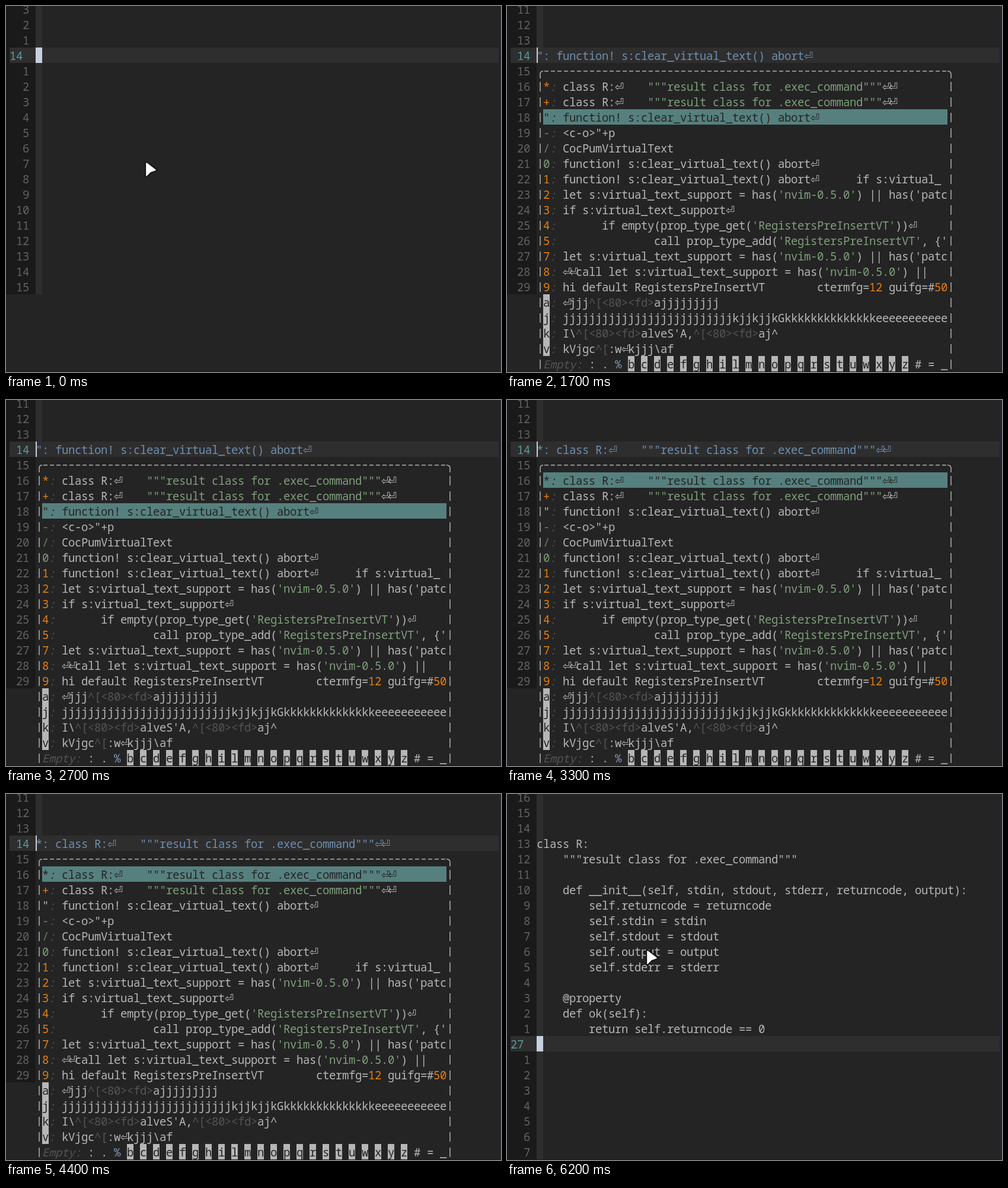
Recreate the animation shown at these times as an HTML page with a canvas. Size 835x617 px, loop 6300 ms.

```html
<!DOCTYPE html>
<html lang="en">
<head>
<meta charset="utf-8">
<title>Register picker</title>
<style>
html, body { margin: 0; width: 100%; height: 100%; overflow: hidden; background: #242424; }
canvas { display: block; }
</style>
</head>
<body>
<canvas id="stage" width="835" height="617"></canvas>
<script>
const ctx = document.getElementById('stage').getContext('2d', { alpha: false });
const W = 835, H = 617, LOOP = 6300;
const CW = 11, RH = 26, BASE = 21, LEFT = 50, FIRST = 11;
const FACE = '19px "Noto Sans Mono", monospace';
const RETURN_FACE = '18.67px "DejaVu Sans", sans-serif';
const C = {
  bg: '#242424', gutter: '#1a1a1a', line: '#2e2e2e', num: '#626262', cur: '#5a9a9c',
  text: '#b6b6b6', dim: '#545454', green: '#7e9e7a', orange: '#e67e0c', blue: '#6e8eae',
  teal: '#56807e', dark: '#242424', panel: '#404040', caret: '#c8d0e0', border: '#b0b0b0'
};

const CODE = [
  'class R:',
  '    """result class for .exec_command"""',
  '',
  '    def __init__(self, stdin, stdout, stderr, returncode, output):',
  '        self.returncode = returncode',
  '        self.stdin = stdin',
  '        self.stdout = stdout',
  '        self.output = output',
  '        self.stderr = stderr',
  '',
  '    @property',
  '    def ok(self):',
  '        return self.returncode == 0'
];
const CLS = 'class R:⏎    """result class for .exec_command"""⏎⏎';
const FUN = 'function! s:clear_virtual_text() abort';
const LET = "let s:virtual_text_support = has('nvim-0.5.0') || ";
const ESC = '^[<80><fd>';

const REGS = [
  ['*', CLS, C.orange],
  ['+', CLS, C.orange],
  ['"', FUN + '⏎', C.text],
  ['-', '<c-o>"+p', '#5f7f5c'],
  ['/', 'CocPumVirtualText', '#64845f'],
  ['0', FUN + '⏎', C.green],
  ['1', FUN + '⏎      if s:virtual_', C.orange],
  ['2', LET + "has('patc", C.orange],
  ['3', 'if s:virtual_text_support⏎', C.orange],
  ['4', "      if empty(prop_type_get('RegistersPreInsertVT'))⏎", C.orange],
  ['5', ' '.repeat(14) + "call prop_type_add('RegistersPreInsertVT', {'", C.orange],
  ['7', LET + "has('patc", C.orange],
  ['8', '⏎⏎call ' + LET, C.orange],
  ['9', 'hi default RegistersPreInsertVT        ctermfg=12 guifg=#50', C.orange],
  ['a', '⏎jjj' + ESC + 'a' + 'j'.repeat(9)],
  ['j', 'j'.repeat(26) + 'kjjkjjkG' + 'k'.repeat(14) + 'e'.repeat(11)],
  ['k', 'I\\' + ESC + "alveS'A," + ESC + 'aj^'],
  ['v', 'kVjgc^[:w⏎kjjj\\af']
];
const EMPTY = 'bcdefghilmnopqrstuwxyz';
const TOKENS = /"""[^"]*"""|'[^']*'|\^\[(?:<80><fd>)?|(?<=[=#])\d+/g;

const rowY = r => r * RH - 8;
const colX = c => LEFT + c * CW;

function box(x, y, w, h, color) {
  ctx.fillStyle = color;
  ctx.fillRect(x, y, w, h);
}

function glyph(ch, x, y, color, italic) {
  if (ch === ' ') return;
  ctx.font = ch === '⏎' ? RETURN_FACE : (italic ? 'italic ' : '') + FACE;
  ctx.fillStyle = color;
  ctx.fillText(ch, x, y + BASE);
}

// Every character sits on the terminal grid.
function text(str, col, row, color = C.text, italic = false) {
  [...str].forEach((ch, i) => glyph(ch, colX(col + i), rowY(row), color, italic));
}

function chip(ch, col, row) {
  box(colX(col), rowY(row), CW, RH, C.text);
  text(ch, col, row, C.dark);
}

function tokenColor(tok) {
  return tok[0] === '^' ? C.dim : /\d/.test(tok[0]) ? C.orange : C.green;
}

function highlighted(str, col, row) {
  let at = 0;
  for (const m of str.matchAll(TOKENS)) {
    text(str.slice(at, m.index), col + at, row);
    text(m[0], col + m.index, row, tokenColor(m[0]));
    at = m.index + m[0].length;
  }
  text(str.slice(at), col + at, row);
}

function editor(curRow, lastRow, insert) {
  const bottom = Math.min(rowY(lastRow + 1), H);
  box(0, 0, W, H, C.bg);
  box(0, 0, LEFT, bottom, C.gutter);
  box(LEFT, 0, CW, bottom, C.line);
  box(6, rowY(curRow), 825, RH, C.line);
  for (let r = 0; r <= lastRow; r++) {
    const here = r === curRow;
    const n = String(insert || here ? FIRST + r : Math.abs(r - curRow));
    const col = here && !insert ? -4 : -1 - n.length;
    text(n, col, r, here ? C.cur : C.num);
  }
}

function caret(row, insert) {
  box(LEFT, rowY(row), insert ? 2 : CW, RH, C.caret);
}

function frameLines() {
  const y = rowY(4), mid = y + 13.75;
  for (let c = 1; c < 63; c++) box(colX(c) + 2, mid - 0.75, 7, 1.5, C.border);
  ctx.strokeStyle = C.border;
  ctx.lineWidth = 1.5;
  ctx.beginPath();
  ctx.moveTo(56, y + 26);
  ctx.lineTo(56, y + 19);
  ctx.quadraticCurveTo(56, mid, 61, mid);
  ctx.moveTo(743, mid);
  ctx.quadraticCurveTo(749, mid, 749, y + 19);
  ctx.lineTo(749, y + 26);
  ctx.stroke();
  for (let r = 5; r < 24; r++) {
    for (const x of [55.25, 748.25]) box(x, rowY(r) + 6, 1.5, 16, C.border);
  }
}

function popup(sel) {
  box(LEFT, rowY(4), 64 * CW, H, C.bg);
  frameLines();
  REGS.forEach(([name, body, color], i) => {
    const row = i + 5;
    if (i === sel) {
      box(colX(1), rowY(row), 62 * CW, RH, C.teal);
      text(name, 1, row, C.dark);
      text(':', 2, row, C.dark, true);
      text(body, 4, row, C.dark);
      return;
    }
    if (color) text(name, 1, row, color);
    else chip(name, 1, row);
    text(':', 2, row, C.dim, true);
    highlighted(body, 4, row);
  });
  text('Empty:', 1, 23, C.dim, true);
  text(': .', 8, 23);
  text('%', 12, 23, '#7e94b4');
  [...EMPTY].forEach((ch, i) => chip(ch, 14 + 2 * i, 23));
  text('# = _', 58, 23);
  text(REGS[sel][0] + ': ' + REGS[sel][1], 0, 3, C.blue);
}

function preview(sel) {
  const lines = sel === 0 ? CODE : [FUN];
  const size = lines.join('\n').length + 1;
  const width = Math.max(...lines.map(l => l.length)) + 2;
  const top = sel + 4;
  // The return mark hangs over the panel's edge, so its tail is cleared too.
  if (sel === 2) box(colX(3 + width), rowY(7), 5, RH, C.teal);
  box(colX(3), rowY(top), width * CW, (lines.length + 1) * RH, C.panel);
  text(`Register: ${REGS[sel][0]} Length: ${size} Lines: ${lines.length}`, 4, top);
  lines.forEach((l, i) => text(l, 4, top + 1 + i));
}

function pointer() {
  ctx.beginPath();
  ctx.moveTo(237, 265);
  ctx.lineTo(252, 276.5);
  ctx.lineTo(243.5, 279.5);
  ctx.lineTo(237, 286);
  ctx.closePath();
  ctx.lineJoin = 'round';
  ctx.strokeStyle = '#161616';
  ctx.lineWidth = 6;
  ctx.stroke();
  ctx.strokeStyle = ctx.fillStyle = '#fff';
  ctx.lineWidth = 1.6;
  ctx.stroke();
  ctx.fill();
}

function selection(t) {
  if (t < 1400) return 0;
  if (t < 1700) return 1;
  if (t < 3100) return 2;
  return t < 3300 ? 1 : 0;
}

function draw(t) {
  const pasted = t >= 4800;
  const insert = t >= 400 && t < 5800;
  const row = pasted ? 16 : 3;
  editor(row, pasted ? 23 : 18, insert);
  if (pasted) CODE.forEach((l, i) => text(l, 0, 3 + i));
  if (t >= 900 && !pasted) {
    const sel = selection(t);
    popup(sel);
    if ((t >= 2300 && t < 2700) || (t >= 3800 && t < 4400)) preview(sel);
  }
  caret(row, insert);
  box(832, 0, 3, H, '#222630');
  box(0, 616, W, 1, '#1a1a1a');
  if (t < 400 || t >= 6200) pointer();
}

const start = performance.now();
function tick(now) {
  draw(Math.max(0, now - start) % LOOP);
  requestAnimationFrame(tick);
}
draw(0);
requestAnimationFrame(tick);
</script>
</body>
</html>
```
